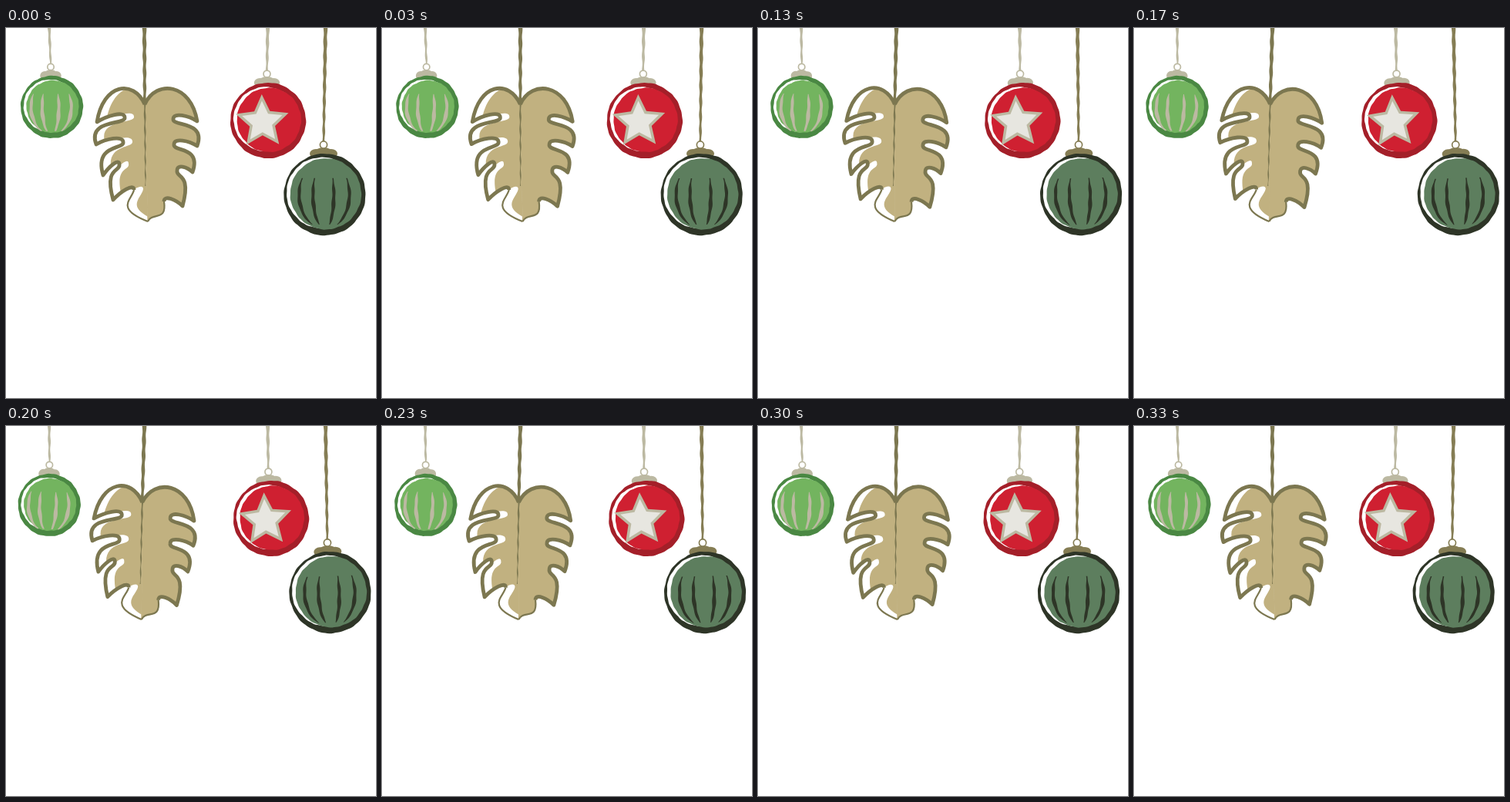
An HTML page that plays this animation: 480 px wide and 480 px high, repeating every 360 ms.

```html
<!DOCTYPE html>
<html>
<head>
<meta charset="utf-8">
<style>
  html, body { margin: 0; height: 100%; overflow: hidden; background: #fff; }
  svg { display: block; width: 100vw; height: 100vh; }
</style>
</head>
<body>
<svg id="stage" viewBox="0 0 480 480"></svg>
<script>
const PALE = '#bcb9a2', OLIVE = '#7c7750', KHAKI = '#c1b180', BRONZE = '#857d54', PINE = '#2e3527';

const range = (n, f) => Array.from({ length: n + 1 }, (_, i) => f(i / n));
const polygon = (points, fill) =>
  `<path d="M${points.map(p => p.map(v => v.toFixed(2))).join('L')}Z" fill="${fill}"/>`;

// Disc with a slightly uneven, hand-cut edge
const disc = (x, y, r, fill) => polygon(range(120, t => {
  const a = t * 2 * Math.PI, d = r + 0.25 * Math.sin(9 * a + x) + 0.2 * Math.sin(23 * a + y);
  return [x + d * Math.cos(a), y + d * Math.sin(a)];
}), fill);

// Upright brush stroke along point(t) with an uneven edge
function brush(point, width, fill) {
  const edge = side => range(50, t => {
    const [x, y] = point(t);
    return [x + side * width(t) / 2 + 0.35 * Math.sin(y * 0.33 + side), y];
  });
  return polygon([...edge(-1), ...edge(1).reverse()], fill);
}

const line = (x0, y0, x1, y1, w0, w1, fill) =>
  brush(t => [x0 + (x1 - x0) * t, y0 + (y1 - y0) * t], t => w0 + (w1 - w0) * t, fill);

// Four meridians of a sphere
const stripes = (x, y, r, fill) => [-0.75, -0.35, 0.25, 0.7].map(u => brush(t => {
  const a = -0.49 + 1.54 * t;
  return [x + u * r * Math.cos(a), y + r * Math.sin(a)];
}, t => 1.5 + 3.2 * Math.sin(Math.PI * t), fill)).join('');

function star(x, y, r, fill) {
  return polygon(Array.from({ length: 10 }, (_, i) => {
    const a = i * Math.PI / 5 - 0.02, d = i % 2 ? r * 0.48 : r;
    return [x + d * Math.sin(a), y - d * Math.cos(a)];
  }), fill);
}

function bauble({ top, x, y, r, rim, face, faceSize, metal, thick }) {
  const mid = x - 1.5, crown = y - r, half = r * 0.34;
  const bump = (dx, dy, rx, ry) =>
    `<ellipse cx="${mid + dx * half}" cy="${crown + dy}" rx="${rx * half}" ry="${ry}" fill="${metal}"/>`;
  return line(top, 0, mid, crown - 15, thick, thick * 0.6, metal) +
    bump(-0.55, 0, 0.45, 6) + bump(0, -1, 0.65, 7) + bump(0.55, 0, 0.45, 6) +
    `<circle cx="${mid}" cy="${crown - 11.5}" r="${3 + r * 0.03}" fill="#fff" stroke="${metal}" stroke-width="1.7"/>` +
    disc(x, y, r, rim) +
    disc(x - r * 0.065, y - r * 0.04, r * faceSize, '#fff') +
    disc(x + r * 0.025, y - r * 0.015, r * faceSize, face);
}

// One half of the leaf: lobes alternate between pointed tips and rounded notches
function leafHalf(side, tips, notches, tail) {
  let [x, y] = tips[0];
  let edge = `M180 99C${180 + side * 15} 66 ${x - side * 8} 72 ${x} ${y}`;
  notches.forEach(([nx, ny], i) => {
    edge += `C${x + 0.35 * (nx - x)} ${y + 0.35 * (ny - y) - 6} ${nx} ${ny - 9} ${nx} ${ny}`;
    if (!tips[i + 1]) return;
    [x, y] = tips[i + 1];
    edge += `C${nx - side * 2} ${ny + 10} ${x + side * 12} ${ny + 2} ${x} ${y}`;
  });
  return { edge, tail, shape: edge + tail + 'Z', end: notches.at(-1) };
}

const outline = ({ edge, tail, end }) =>
  `<path d="${edge}" stroke-width="4.8"/><path d="M${end}${tail}" stroke-width="2.2"/>`;

const left = leafHalf(-1, [[118, 122], [117, 151], [126, 191], [139, 223]],
  [[154, 116], [152, 148], [147, 177], [166, 210]], 'C164 222 140 234 184 251');
const right = leafHalf(1, [[248, 121], [248, 153], [242, 187], [229, 231]],
  [[217, 118], [218, 151], [222, 185], [205, 225]], 'C209 252 190 238 184 251');

const leaf = `
  <clipPath id="inside"><path d="${left.shape}"/></clipPath>
  <path d="${right.shape}" fill="${KHAKI}" stroke="${KHAKI}"/>
  <g clip-path="url(#inside)"><path d="${left.shape}" fill="${KHAKI}" transform="translate(12 -1)"/></g>
  <g fill="none" stroke="${OLIVE}" stroke-linejoin="round">${outline(left)}${outline(right)}</g>` +
  line(179.5, 0, 180, 98, 5, 3.6, OLIVE) + line(180, 97, 181, 205, 2.2, 1, OLIVE);

const green = bauble({ top: 56, x: 59.5, y: 102.5, r: 40.5, rim: '#4a8843', face: '#73b45f',
  faceSize: 0.84, metal: PALE, thick: 3.6 }) + stripes(59.5, 102.5, 36, PALE);

const red = bauble({ top: 339.5, x: 340, y: 120, r: 49, rim: '#a41f29', face: '#cf2031',
  faceSize: 0.85, metal: PALE, thick: 4.4 }) + star(332.5, 122, 36, PALE) + star(332.5, 122, 27.5, '#e7e6e0');

const dark = bauble({ top: 414.5, x: 413.5, y: 216, r: 53, rim: PINE, face: '#5d7e5e',
  faceSize: 0.87, metal: BRONZE, thick: 4.8 }) + stripes(414, 216, 45, PINE);

// Each ornament swings about the top of its string
const ornaments = [[green, 56, 1], [leaf, 179.5, 1], [red, 339.5, -1], [dark, 414.5, -1]];
const stage = document.getElementById('stage');
stage.innerHTML = ornaments.map(([art]) => `<g>${art}</g>`).join('');

// Thirty poses a second, each starting on a whole hundredth
const LOOP = 360, SWING = 2.1;
const steps = Array.from({ length: 11 }, (_, i) => 10 * Math.round(i * 10 / 3));

function draw() {
  const time = performance.now() % LOOP;
  const step = steps.findLast(s => s <= time);
  const angle = SWING * (1 - Math.abs(1 - step / (LOOP / 2)));
  ornaments.forEach(([, pivot, side], i) =>
    stage.children[i].setAttribute('transform', `rotate(${side * angle} ${pivot} 0)`));
  requestAnimationFrame(draw);
}
draw();
</script>
</body>
</html>
```
